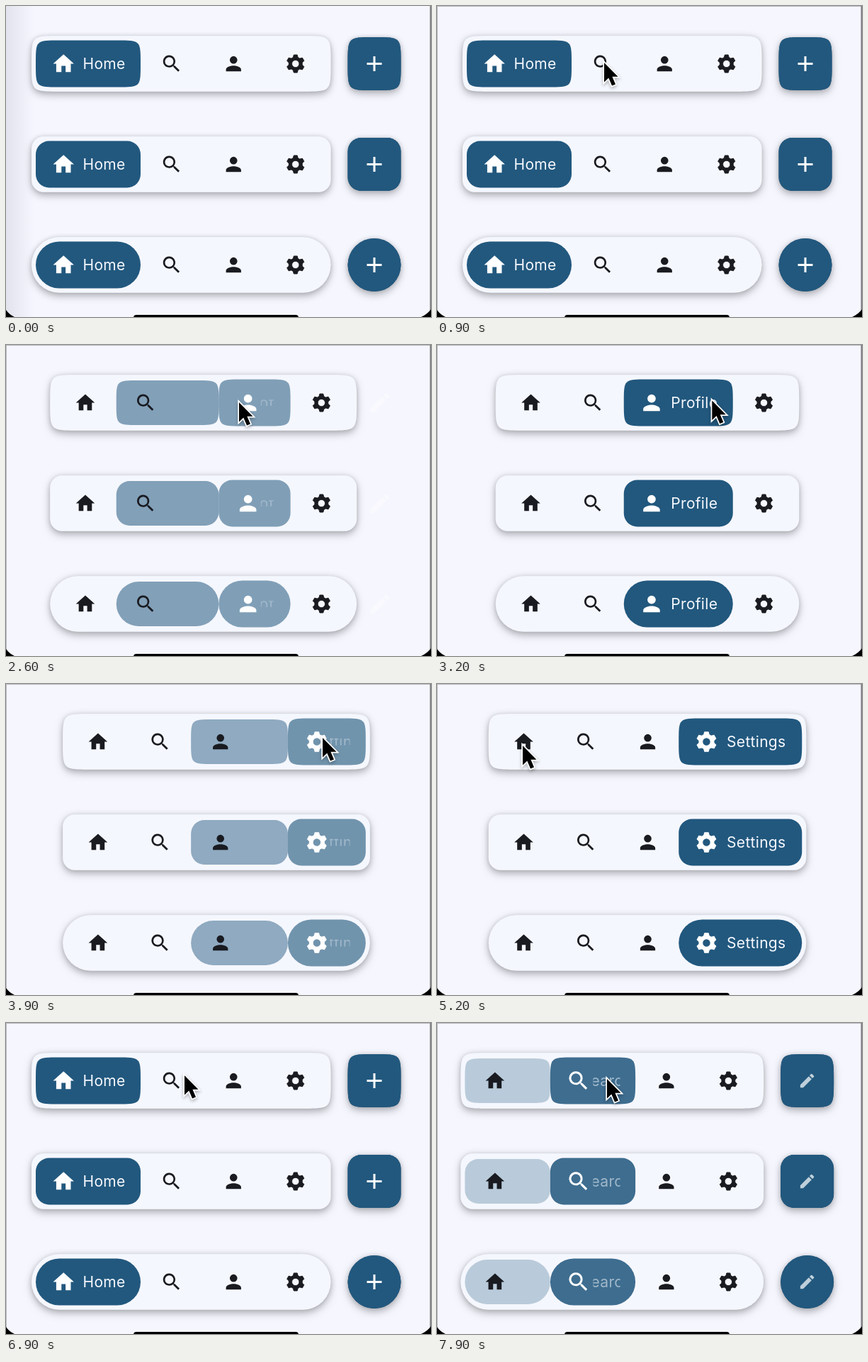
Animation, 600 px wide and 439 px high, one loop 8000 ms. Source, as an HTML page with a canvas:

```html
<!DOCTYPE html>
<html lang="en">
<head>
<meta charset="utf-8">
<title>Navigation bars</title>
<style>
html, body { margin: 0; width: 100%; height: 100%; overflow: hidden; background: #f5f6fe; }
canvas { display: block; }
</style>
</head>
<body>
<canvas id="stage" width="600" height="439"></canvas>
<script>
const ctx = document.getElementById('stage').getContext('2d');
const LOOP = 8000, SLOT = 87.5, CENTER = 297, BLUE = '#22587e', INK = '#191b21', SURFACE = '#f5f7fe';
const clamp = v => Math.max(0, Math.min(1, v));
const mix = (a, b, k) => a + (b - a) * k;
const smooth = k => (1 - Math.cos(Math.PI * clamp(k))) / 2;

function gearPath() {
  const p = new Path2D();
  const at = (r, deg) => [12 + r * Math.sin(deg * Math.PI / 180), 12 - r * Math.cos(deg * Math.PI / 180)];
  for (let a = 0; a < 360; a += 60)
    for (const [r, d] of [[7.2, -21], [9.6, -11], [9.6, 11], [7.2, 21]]) p.lineTo(...at(r, a + d));
  p.closePath();
  p.moveTo(15.9, 12);
  p.arc(12, 12, 3.9, 0, 7);
  p.closePath();
  return p;
}
const icons = {
  home: new Path2D('M10 20v-6h4v6h5v-8h3L12 3 2 12h3v8z'),
  search: new Path2D('M15.5 14h-.8l-.3-.3A6.5 6.5 0 1 0 13.7 14.4l.3.3v.8l5 5L20.5 19zM9.5 14A4.5 4.5 0 1 1 9.5 5 4.5 4.5 0 0 1 9.5 14z'),
  person: new Path2D('M12 12a4 4 0 1 0 0-8 4 4 0 0 0 0 8zm0 2c-2.7 0-8 1.3-8 4v2h16v-2c0-2.7-5.3-4-8-4z'),
  gear: gearPath(),
  plus: new Path2D('M19 13h-6v6h-2v-6H5v-2h6V5h2v6h6z'),
  pencil: new Path2D('M3 17.25V21h3.75L17.8 9.9l-3.75-3.75zM20.7 7a1 1 0 0 0 0-1.4l-2.3-2.3a1 1 0 0 0-1.4 0l-1.9 1.8 3.75 3.75z')
};
const items = [
  { icon: 'home', label: 'Home', width: 148, fab: 'plus' },
  { icon: 'search', label: 'Search', width: 159.5, fab: 'pencil' },
  { icon: 'person', label: 'Profile', width: 154 },
  { icon: 'gear', label: 'Settings', width: 174 }
];
// [time, selected item]
const taps = [[-2000, 0], [1060, 1], [2436, 2], [3714, 3], [5300, 0], [7642, 1]];
// [time, x, y]
const pointer = [
  [100, 330, 120], [800, 236, 80], [1250, 236, 80], [1700, 337, 82], [1900, 337, 82],
  [2350, 329, 81], [2900, 329, 81], [3500, 447, 76], [4200, 447, 76], [5000, 121, 87],
  [5900, 121, 87], [6700, 252, 74], [6900, 252, 74], [7200, 240, 79]
];

// style 0: continuous corners, 1: rounded corners, 2: stadium
function box(x, y, w, h, style, radius) {
  ctx.beginPath();
  if (style) return ctx.roundRect(x, y, w, h, style === 1 ? radius : Math.min(w, h) / 2);
  const r = Math.min(w, h) / 2, X = x + w, Y = y + h;
  ctx.moveTo(x, y + r);
  ctx.bezierCurveTo(x, y, x, y, x + r, y);
  ctx.lineTo(X - r, y);
  ctx.bezierCurveTo(X, y, X, y, X, y + r);
  ctx.lineTo(X, Y - r);
  ctx.bezierCurveTo(X, Y, X, Y, X - r, Y);
  ctx.lineTo(x + r, Y);
  ctx.bezierCurveTo(x, Y, x, Y, x, Y - r);
  ctx.closePath();
}

function fill(color, alpha = 1) {
  ctx.globalAlpha = alpha;
  ctx.fillStyle = color;
  ctx.fill();
  ctx.globalAlpha = 1;
}

function fillRaised(color, alpha = 1) {
  for (const [dy, blur, shade] of [[0, 6, .14], [5, 11, .26]]) {
    ctx.shadowColor = `rgba(0,0,0,${shade})`;
    ctx.shadowBlur = blur;
    ctx.shadowOffsetY = dy;
    fill(color, alpha);
  }
  ctx.shadowColor = 'transparent';
}

function drawIcon(name, x, y, scale, color, alpha = 1) {
  if (alpha <= 0 || scale <= 0) return;
  ctx.save();
  ctx.globalAlpha = alpha;
  ctx.translate(x, y);
  ctx.scale(scale, scale);
  ctx.translate(-12, -12);
  ctx.fillStyle = ctx.strokeStyle = color;
  ctx.fill(icons[name], 'evenodd');
  if (name === 'gear') {
    ctx.lineWidth = .7;
    ctx.lineJoin = 'round';
    ctx.stroke(icons.gear);
  }
  ctx.restore();
}

function drawLabel(text, x, y, open) {
  ctx.save();
  if (open < 1) {
    const w = ctx.measureText(text).width * open, h = 30 * open;
    ctx.beginPath();
    ctx.rect(x - w / 2, y - h / 2, w, h);
    ctx.clip();
  }
  ctx.globalAlpha = open;
  ctx.fillStyle = '#f7f9ff';
  ctx.fillText(text, x, y + 7.6);
  ctx.restore();
}

function stateAt(t) {
  let i = taps.length - 1;
  while (taps[i][0] > t) i--;
  const age = t - taps[i][0];
  const to = taps[i][1], from = i ? taps[i - 1][1] : to;
  const p = smooth(age / 550);
  const shift = 1 - (1 - clamp(age / 420)) ** 2;
  const widths = items.map((it, n) =>
    SLOT + (it.width - SLOT) * ((n === to ? p : 0) + (n === from && from !== to ? 1 - p : 0)));
  const room = mix(items[from].fab ? 1 : 0, items[to].fab ? 1 : 0, shift);
  const bar = widths.reduce((a, b) => a + b, 12);
  return { age, to, from, p, widths, room, bar, left: CENTER - (bar + 99.5 * room) / 2 };
}

function drawFab(s, y, style) {
  if (s.room <= 0) return;
  const x = s.left + s.bar + 16 + 45.5 * s.room;
  const now = items[s.to].fab, old = items[s.from].fab;
  const alpha = now ? s.room : clamp((s.room - .4) / .6);
  if (alpha > 0) {
    box(x - 37.5, y - 37.5, 75, 75, style, 19);
    fillRaised(BLUE, alpha);
  }
  if (now && old && now !== old) {
    const out = clamp(1 - s.age / 200), come = clamp(s.age / 360);
    drawIcon(old, x, y, 1.5 * out, '#fff', out);
    drawIcon(now, x, y, 1.5 * come, '#fff', come);
  } else {
    drawIcon(now || old, x, y, 1.5, '#fff', s.room);
  }
}

function drawRow(s, y, style) {
  box(s.left, y - 39.2, s.bar, 78.4, style, 17);
  fillRaised(SURFACE);
  drawFab(s, y, style);
  const fadeIn = clamp(s.age / 300), fadeOut = clamp(1 - s.age / 360);
  let x = s.left + 6;
  items.forEach((it, n) => {
    const w = s.widths[n], active = n === s.to, leaving = n === s.from && !active;
    const alpha = active ? fadeIn : leaving ? fadeOut : 0;
    const h = active ? 66 : 63;
    if (alpha > 0) {
      box(x, y - h / 2, w, h, style, 19);
      fill(BLUE, alpha);
    }
    drawIcon(it.icon, x + mix(43.75, 39.2, alpha), y, active ? 1.47 : 1.33, active ? '#fff' : INK);
    if (active) drawLabel(it.label, x + w / 2 + mix(17, 22.5, s.p), y, s.p ** .8);
    x += w;
  });
}

function drawPointer(t) {
  if (t < pointer[0][0]) return;
  let i = pointer.length - 1;
  while (pointer[i][0] > t) i--;
  const a = pointer[i], b = pointer[i + 1] || a;
  const k = smooth((t - a[0]) / (b[0] - a[0] || 1));
  ctx.save();
  ctx.translate(mix(a[1], b[1], k), mix(a[2], b[2], k));
  const arrow = new Path2D('M0 0V27.5L6.3 21.6 11 32.5 16 30.4 11.4 19.8H19.5Z');
  ctx.shadowColor = 'rgba(0,0,0,.3)';
  ctx.shadowBlur = 4;
  ctx.shadowOffsetY = 2;
  ctx.strokeStyle = '#fff';
  ctx.lineWidth = 3.4;
  ctx.stroke(arrow);
  ctx.shadowColor = 'transparent';
  ctx.fillStyle = '#000';
  ctx.fill(arrow);
  ctx.restore();
}

function drawDevice(t) {
  if (t < 100) {
    const g = ctx.createLinearGradient(0, 0, 40, 0);
    g.addColorStop(0, 'rgba(110,110,130,.14)');
    g.addColorStop(1, 'rgba(110,110,130,0)');
    ctx.fillStyle = g;
    ctx.fillRect(0, 0, 40, 439);
  } else {
    ctx.fillStyle = '#b9bac0';
    ctx.fillRect(0, 0, 600, 1);
    ctx.fillRect(0, 0, 1, 439);
  }
  ctx.fillStyle = '#77787d';
  ctx.fillRect(598.5, 0, 1.5, 439);
  ctx.fillStyle = '#000';
  ctx.fill(new Path2D('M0 429Q4 435 12 439H0ZM600 428Q595 435 586 439H600Z'));
  ctx.beginPath();
  ctx.roundRect(180, 436, 233, 8, 4);
  ctx.fill();
}

function frame(now) {
  const t = now % LOOP;
  ctx.fillStyle = '#f5f6fe';
  ctx.fillRect(0, 0, 600, 439);
  ctx.font = '21px Inter, "Open Sans", sans-serif';
  ctx.letterSpacing = '0.3px';
  ctx.textAlign = 'center';
  const s = stateAt(t);
  for (let style = 0; style < 3; style++) drawRow(s, 81.5 + 142 * style, style);
  drawPointer(t);
  drawDevice(t);
  requestAnimationFrame(frame);
}
requestAnimationFrame(frame);
</script>
</body>
</html>
```
